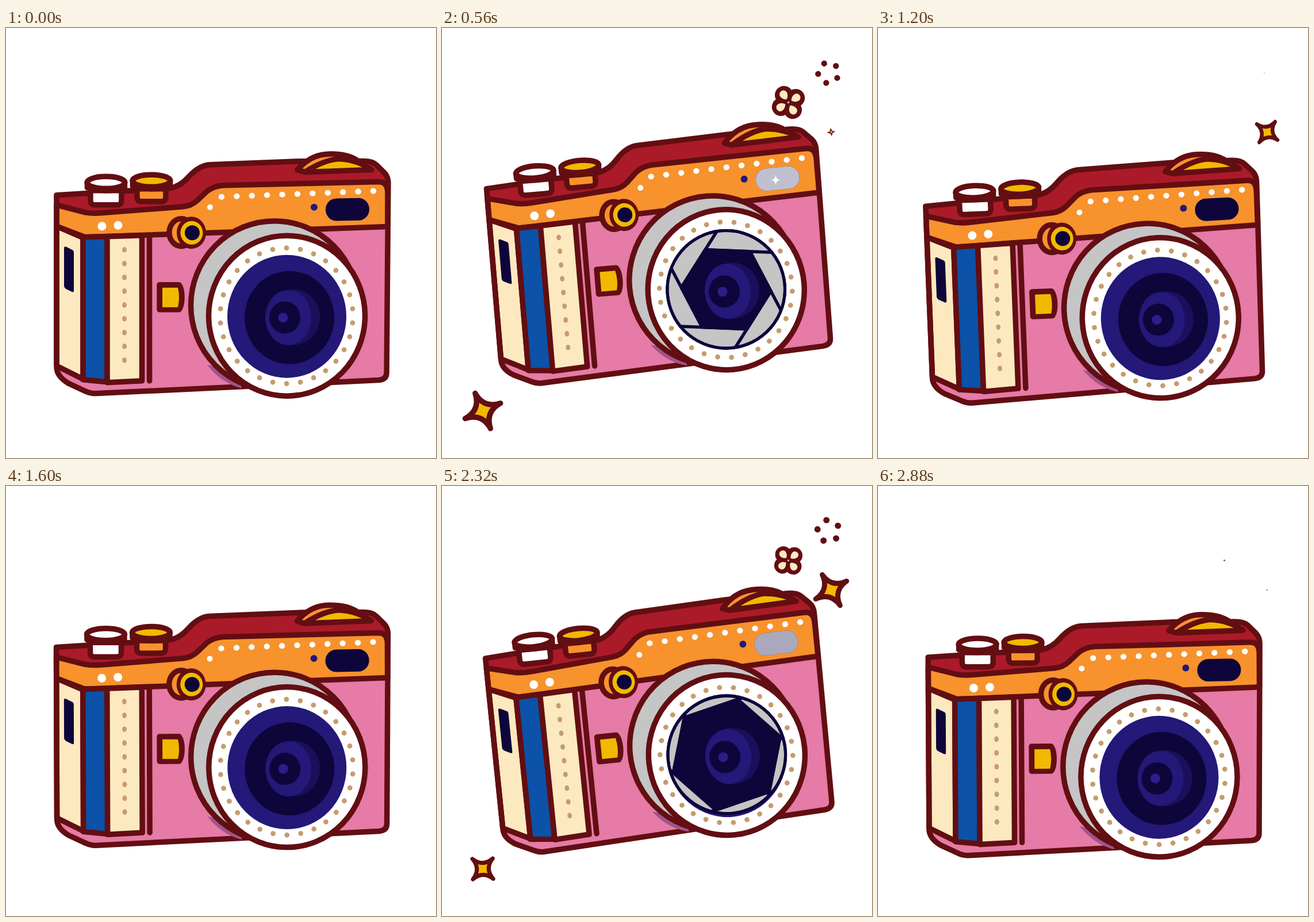
Animation of 748 by 748 pixels, one loop 2960 ms. Source, as an HTML page:

```html
<!DOCTYPE html>
<html lang="en">
<head>
<meta charset="utf-8">
<title>Camera</title>
<style>
html, body { margin: 0; width: 100%; height: 100%; overflow: hidden; background: #fff; }
svg { display: block; width: 100vw; height: 100vh; }
.o { stroke: #620e12; stroke-width: 9.5; stroke-linejoin: round; stroke-linecap: round; }
.dark { fill: #620e12; }
.navy { fill: #0e053a; }
.violet { fill: #241878; }
.dusk { fill: #1b0f5c; }
.pupil { fill: #2b1e8a; }
.cream { fill: #fde9bf; }
.orange { fill: #f7922d; }
.yellow { fill: #f2b900; }
.red { fill: #ab1a28; }
.pink { fill: #e57ba6; }
.blue { fill: #0b52a8; }
.shade { fill: #a0548a; }
.white { fill: #fff; }
.gray { fill: #c5c5c5; }
.tan { fill: #c69c6d; }
.none { fill: none; }
</style>
</head>
<body>
<svg id="stage" viewBox="0 0 748 748"></svg>
<script>
const LOOP = 2960, CYCLE = LOOP / 2, STEP = 80, TAU = Math.PI * 2;
const stage = document.getElementById('stage');

const ellipse = (cls, x, y, rx, ry = rx) =>
  `<ellipse class="${cls}" cx="${x}" cy="${y}" rx="${rx}" ry="${ry}"/>`;
const path = (cls, d) => `<path class="${cls}" d="${d}"/>`;
const repeat = (n, draw) => Array.from({ length: n }, (_, i) => draw(i)).join('');
const polar = (r, a) => [r * Math.cos(a), r * Math.sin(a)];

const lowerEdge = 'L662 598 Q662 610 648 611 L155 634 Q146 634 138 630 L108 616 Q88 604 88 588Z';
const bodyShape = 'M88 289 L285 277 Q303 274 318 257 Q336 237 355 236 L515 230 L622 230 ' +
  'Q638 230 645 237 L659 251 Q665 258 665 268 ' + lowerEdge;

// A top knob: stem, dark cap and coloured lid around (x, y).
function knob(x, y, lid, stem, half, depth) {
  const left = x - half, right = x + half, bottom = y + depth;
  return path('o ' + stem, `M${left} ${y + 14} V${bottom - 8} Q${left} ${bottom} ${left + 8} ${bottom}
      H${right - 8} Q${right} ${bottom} ${right} ${bottom - 8} V${y + 14}Z`) +
    path('o dark', `M${x - 32.5} ${y} V${y + 9} Q${x} ${y + 19} ${x + 32.5} ${y + 9} V${y}Z`) +
    ellipse('o ' + lid, x, y, 33, 10.5);
}

function body() {
  return path('red', bodyShape) +
    path('pink', 'M88 343 L138 362 L664 344 ' + lowerEdge) +
    path('o orange', `M88 306 L138 319 Q150 321 165 320 L308 309 Q322 308 333 298 L350 282
      Q362 273 378 272 L648 266 Q664 266 664 285 L664 344 L138 362 L88 343Z`) +
    path('o cream', 'M88 343 L134 363 V609 L88 586Z') +
    path('o blue', 'M134 362 L176 361 V614 L134 610Z') +
    path('o cream', 'M176 361 L236.5 359 V612 L176 615Z') +
    path('o none', 'M249.5 361 V612') +
    path('navy', 'M101 381 Q101 377 105 379 L115 384 Q118 385 118 389 V455 Q118 459 114 457 L104 452 Q101 450 101 447Z') +
    repeat(9, i => ellipse('tan', 206, 384 + 24 * i, 4, 4.8)) +
    path('o none', bodyShape) +
    knob(174, 267, 'white', 'white', 27, 39) +
    knob(253, 264, 'yellow', 'orange', 25, 36) +
    path('o orange', 'M507 245 Q530 218 562 217.5 Q592 217 610 228 L520 249Z') +
    path('o yellow', 'M520 249 Q552 228 580 226 Q612 228 636 245Z');
}

function details() {
  return ellipse('white', 167, 343, 7.5) + ellipse('white', 195, 341.5, 7.5) +
    ellipse('white', 355, 310, 5) +
    repeat(11, i => ellipse('white', 375 + 26.4 * i, 292 - i, 5.2, 5)) +
    ellipse('o orange', 305, 354, 21, 24) +
    ellipse('dark', 322.5, 354.5, 25.5, 28) + ellipse('yellow', 323, 354.5, 19.5, 20.5) +
    ellipse('navy', 324, 354.5, 13) +
    path('o dark', 'M267 445 H301 Q306 452 306 466 Q306 482 301 488 H267Z') +
    path('yellow', 'M272 450 H299 Q303 467 299 484 H272Z') +
    ellipse('violet', 536, 310, 6);
}

// Six blades: a hexagonal opening whose edges run on to the rim.
function iris(closed, tilt) {
  const rim = 102.5, apothem = rim - 35 * closed, radius = apothem / Math.cos(TAU / 12);
  const turn = (7.1 - tilt) * TAU / 360;
  const corner = i => polar(radius, turn + i * TAU / 6);
  const reach = Math.sqrt(rim * rim - apothem * apothem);
  const rays = repeat(6, i => {
    const a = turn + (i + 0.5) * TAU / 6;
    const [nx, ny] = polar(apothem, a), [tx, ty] = polar(reach, a + TAU / 4);
    return `M${corner(i)} L${nx + tx} ${ny + ty}`;
  });
  return `<g transform="translate(488.5 498.5)" opacity="${Math.min(1, closed * 3)}"
      stroke="#0e053a" stroke-width="5.5" stroke-linejoin="round" clip-path="url(#rim)">` +
    ellipse('gray', 0, 0, rim) +
    path('navy', 'M' + [0, 1, 2, 3, 4, 5].map(corner).join('L') + 'Z') +
    path('none', rays) + ellipse('none', 0, 0, rim) + '</g>';
}

function lens(closed) {
  return path('shade', 'M350 584 Q374 616 410 625 L402 598Z') +
    ellipse('o gray', 467, 481, 145.5, 147) +
    ellipse('o white', 488.5, 499, 136, 139.5) +
    repeat(30, i => {
      const [x, y] = polar(1, -TAU / 4 + i * TAU / 30);
      return ellipse('tan', 488 + 115.5 * x, 499 + 118 * y, 4.4);
    }) +
    (closed < 1 ? ellipse('violet', 488.5, 500, 103.5, 107) + ellipse('navy', 493, 502, 78, 81) : '') +
    (closed > 0 ? iris(closed, 40 * (1 - closed)) : '') +
    ellipse('dusk', 499.5, 501.5, 46.5, 48.5) +
    ellipse('violet', 491, 502, 40, 48) +
    ellipse('navy', 485, 502, 27, 28) +
    ellipse('pupil', 482, 502, 8.5);
}

const starShape = (tip, waist) => 'M' + tip + ' 0' + repeat(4, i => {
  const [cx, cy] = polar(waist, (i + 0.5) * TAU / 4), [x, y] = polar(tip, (i + 1) * TAU / 4);
  return `Q${cx} ${cy} ${x} ${y}`;
}) + 'Z';

function flash(light, glint) {
  const pill = (fill, opacity) => `<rect x="556" y="294.5" width="76" height="39" rx="19"
      transform="rotate(-1 594 314)" fill="${fill}" opacity="${opacity}"/>`;
  return pill('#0e053a', 1) + (light ? pill('#dedee8', light) : '') +
    sprite(path('white', starShape(13.5, 2)), 590.5, 316, glint, 4.8);
}

const star = path('o yellow', starShape(34, 4));
const flower = repeat(4, i => `<g transform="rotate(${90 * i})">` + ellipse('dark', 15, 0, 15.8) + '</g>') +
  repeat(4, i => `<g transform="rotate(${90 * i})">` +
    path('cream', 'M6 0 Q10.5 -6.8 17 -6.8 A6.3 6.8 0 0 1 17 6.8 Q10.5 6.8 6 0Z') + '</g>') +
  ellipse('cream', 0, 0, 1.6);
const ring = repeat(5, i => ellipse('dark', ...polar(19, i * TAU / 5), 5.5));

// Rises from 0 to 1 and falls back between two times.
const swell = (t, from, to) => t > from && t < to ? Math.sin(Math.PI * (t - from) / (to - from)) : 0;
const smooth = (t, from, to) => {
  const u = Math.min(1, Math.max(0, (t - from) / (to - from)));
  return u * u * (3 - 2 * u);
};
const sprite = (art, x, y, size, angle) => size > 0.01
  ? `<g transform="translate(${x} ${y}) rotate(${angle}) scale(${size})">${art}</g>` : '';
const spin = size => -22 - 92 * (1 - size);

const staticBody = body() + details();

function draw(time) {
  const t = Math.floor((time % LOOP) / STEP) * STEP;
  const phase = t % CYCLE, turn = phase / CYCLE * TAU;
  const tilt = -2.98 * (1 - Math.cos((phase - 32) / CYCLE * TAU));
  const lift = -12.5 + 22.6 * Math.cos(turn - 5.393) - Math.sin(2 * turn);
  const closed = smooth(phase, 280, 440) - smooth(phase, 760, 920);
  const low = swell(phase, 140, 1090), high = swell(phase, 512, 1410);
  const bloom = swell(t, 110, 1030) + swell(t, 2000, 2895);
  const dots = Math.pow(swell(t, 190, 1204) + swell(t, 1680, 2880), 0.7);

  stage.innerHTML =
    '<clipPath id="rim"><circle r="105"/></clipPath>' +
    `<g transform="translate(0 ${lift}) rotate(${tilt} 374 426)">` +
    staticBody + flash(swell(phase, 330, 1030), swell(phase, 525, 690)) + lens(closed) + '</g>' +
    sprite(star, 71, 666, low, spin(low)) +
    sprite(star, 677, 181, high, spin(high)) +
    sprite(flower, 602.5, 129.5, bloom, spin(bloom) - 9) +
    sprite(ring, 672, 78, dots, 45 - 240 * (1 - dots));
}

const start = performance.now();
function tick() {
  draw(performance.now() - start);
  requestAnimationFrame(tick);
}
tick();
</script>
</body>
</html>
```
